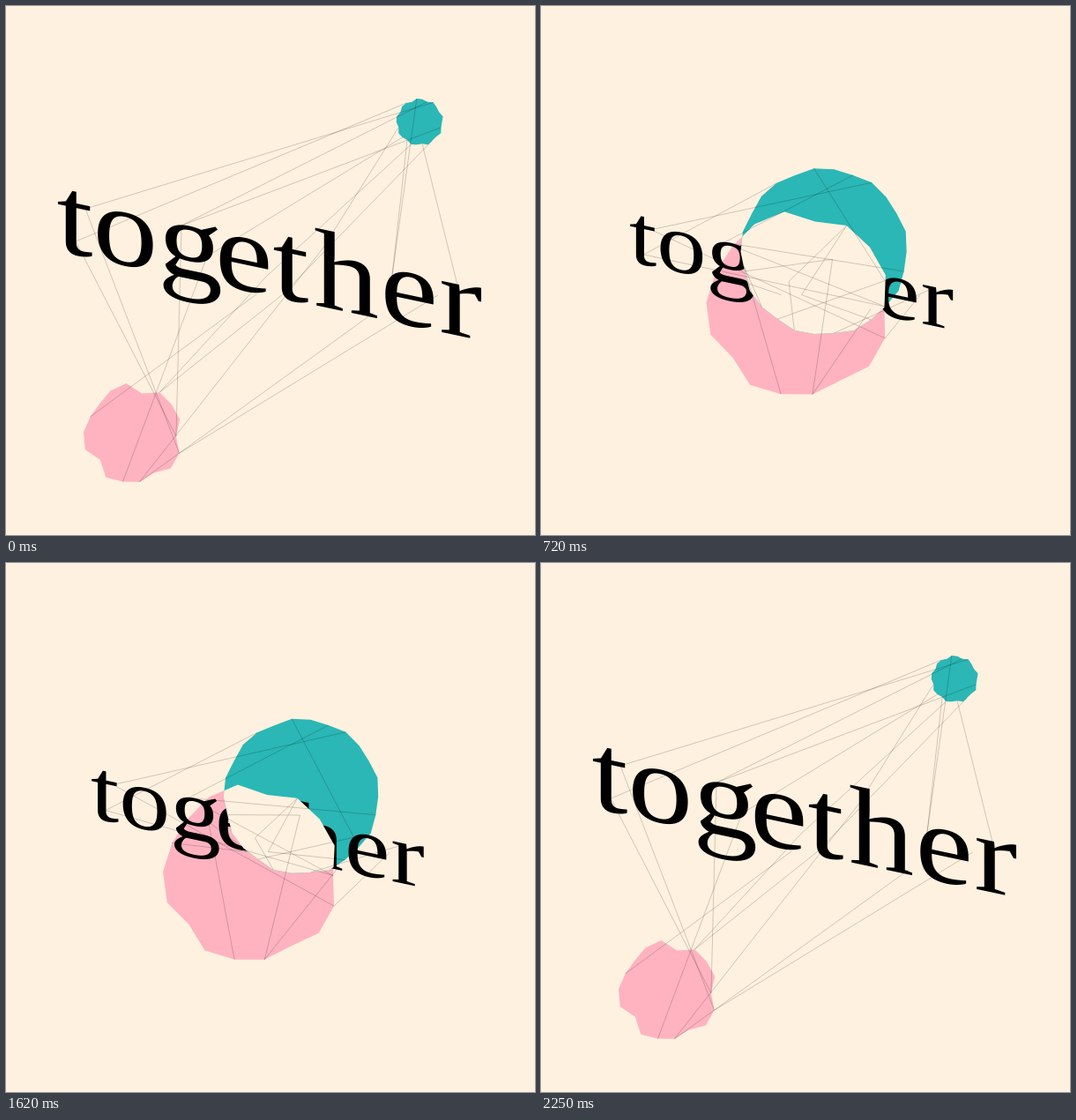
An HTML page that plays this animation: 600x600 px, repeating every 2.34 s.

```html
<!DOCTYPE html>
<html lang="en">
<head>
<meta charset="utf-8">
<title>together</title>
<style>
html, body { margin: 0; width: 100%; height: 100%; overflow: hidden; background: #fff1df; }
svg { display: block; width: 100%; height: 100%; }
text { font: 100px "Liberation Serif", "Times New Roman", serif; text-rendering: geometricPrecision; }
</style>
</head>
<body>
<svg viewBox="0 0 600 600">
  <defs><clipPath id="clip"><polygon id="clipShape"/></clipPath></defs>
  <polygon id="pink" fill="#ffb3c1"/>
  <polygon id="teal" fill="#2ab7b5"/>
  <g id="word">
    <text transform="matrix(1.474 .312 0 1.265 57.5 277.3)" dx="0 0 0 -6 0 4 1 1">together</text>
  </g>
  <polygon id="overlap" fill="#fff1df" clip-path="url(#clip)"/>
  <path id="threads" fill="none" stroke="#000" stroke-width=".42" stroke-opacity=".45"/>
</svg>
<script>
const STEP = 90, FRAMES = 26, TRAVEL = 216, TURN = 2 * Math.PI;
const PIVOT = { x: 236.4, y: 329.6 };
const el = id => document.getElementById(id);

// Ripples dent the rim: n waves around it, with a crest at the given corner.
const teal = {
  x: 469.3, y: 131.5, dir: -1, sides: 26, radius: 25.8, grow: 99.5, twist: 0,
  ripples: [{ n: 9, crest: 2, size: 1.4 }]
};
const pink = {
  x: 144, y: 486, dir: 1, sides: 18, radius: 54, grow: 70.8, twist: 0.04,
  ripples: [{ n: 5, crest: 5.2, size: 4 }, { n: 8, crest: 15, size: 3 }]
};

// Spots on the word, each tied to some corners of the blobs.
const knots = [
  { x: 90, y: 230, teal: [22], pink: [1] },
  { x: 79, y: 267, teal: [17], pink: [0] },
  { x: 199, y: 249, teal: [21, 1], pink: [0] },
  { x: 228, y: 284, teal: [10], pink: [5] },
  { x: 284, y: 327, teal: [], pink: [10] },
  { x: 295, y: 307, teal: [8], pink: [15] },
  { x: 314, y: 327, teal: [4], pink: [15] },
  { x: 360, y: 274, teal: [12], pink: [4] },
  { x: 417, y: 348, teal: [], pink: [4] },
  { x: 438, y: 306, teal: [19, 9], pink: [] },
  { x: 490, y: 328, teal: [], pink: [1] },
  { x: 512, y: 316, teal: [6], pink: [] }
];

// The dents keep their size while the round part grows.
function corners(blob, p) {
  const shift = blob.dir * TRAVEL * p;
  return Array.from({ length: blob.sides }, (_, i) => {
    const a = TURN * i / blob.sides;
    const rim = blob.ripples.reduce((r, w) =>
      r + w.size * Math.cos(TURN * w.n * (i - w.crest) / blob.sides), blob.radius);
    const b = a + blob.twist;
    return [blob.x + shift + rim * Math.cos(b) + blob.grow * p * Math.cos(a),
            blob.y - shift * 0.993 + rim * Math.sin(b) + blob.grow * p * Math.sin(a)];
  });
}

function threads(rims, scale) {
  return knots.map(k => {
    const x = PIVOT.x + (k.x - PIVOT.x) * scale;
    const y = PIVOT.y + (k.y - PIVOT.y) * scale;
    const ends = [...k.teal.map(i => rims.teal[i]), ...k.pink.map(i => rims.pink[i])];
    return ends.map(end => `M${x} ${y}L${end}`).join("");
  }).join("");
}

function draw(ms) {
  const frame = Math.floor(ms / STEP) % FRAMES;
  // The swing takes 25 steps, so the last frame repeats the first.
  const phase = TURN * frame / 25 - 0.058;
  const p = (1 - Math.cos(phase)) / 2;
  const scale = 1 - 0.347 * p;
  const rims = { teal: corners(teal, p), pink: corners(pink, p) };
  for (const id of ["teal", "overlap"]) el(id).setAttribute("points", rims.teal.join(" "));
  for (const id of ["pink", "clipShape"]) el(id).setAttribute("points", rims.pink.join(" "));
  el("word").setAttribute("transform",
    `translate(${PIVOT.x} ${PIVOT.y}) scale(${scale}) translate(${-PIVOT.x} ${-PIVOT.y})`);
  el("threads").setAttribute("d", threads(rims, scale));
}

const start = performance.now();
function tick() {
  draw(performance.now() - start);
  requestAnimationFrame(tick);
}
tick();
</script>
</body>
</html>
```
